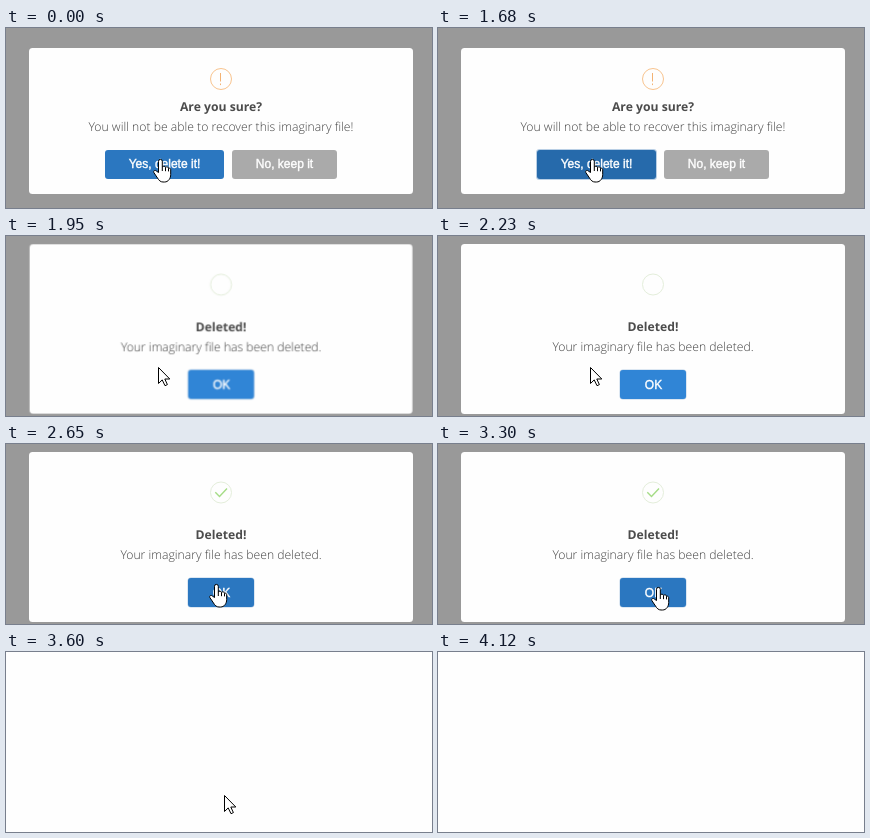
An HTML page for the animation above (4400 ms loop, 426x180 px).

```html
<!DOCTYPE html>
<html lang="en">
<head>
<meta charset="utf-8">
<title>Delete confirmation</title>
<style>
html, body { margin: 0; width: 100%; height: 100%; overflow: hidden; background: #fefefe; }
svg { display: block; width: 426px; height: 180px; }

.anim, .anim * { animation: 4400ms step-end infinite; }
.overlay { animation-name: overlay; }
.ask { animation-name: ask; }
.done { animation-name: done; transform-origin: 215px 93px; }
.yes { animation-name: yes; }
.focus { animation-name: focus; }
.ok { animation-name: ok; }
.ok-box { animation-name: ok-box; }
.check { stroke-dasharray: 1 2; animation-name: check; }
.cursor { animation-name: move; }
.hand { animation-name: hand; }
.arrow { animation-name: arrow; }

.popup { fill: #fefefe; }
.ring { fill: #b9cfe5; }
.title, .msg { font-family: "Open Sans", "Noto Sans", sans-serif; text-anchor: middle; text-rendering: geometricPrecision; }
.title { font-size: 12.2px; font-weight: 700; fill: #4c4c4c; }
.msg { font-size: 12.2px; font-weight: 300; fill: #404040; }
.label { font: 12px "Liberation Sans", Arial, sans-serif; text-anchor: middle; fill: #fff; stroke: #fff; stroke-width: .4; }

@keyframes overlay {
  0% { opacity: .4 }
  40.9% { opacity: 0 }
  44.31% { opacity: .4 }
  81.81%, 100% { opacity: 0 }
}
@keyframes ask {
  0% { opacity: 1 }
  40.9%, 100% { opacity: 0 }
}
@keyframes yes {
  0% { fill: #2b77c0 }
  38.18%, 100% { fill: #266aab }
}
@keyframes focus {
  0% { opacity: 0 }
  38.18%, 100% { opacity: 1 }
}
@keyframes done {
  0% { opacity: 0; transform: none }
  40.9% { opacity: 1; transform: scale(.7) }
  44.31% { opacity: 1; transform: scale(.997) }
  47.72% { opacity: 1; transform: none }
  78.4% { opacity: .87; transform: scale(.943) }
  81.81%, 100% { opacity: 0; transform: none }
}
@keyframes ok {
  0% { opacity: 1 }
  78.4%, 100% { opacity: .4 }
}
@keyframes ok-box {
  0% { fill: #3085d6 }
  56.81%, 100% { fill: #2b77c0 }
}
@keyframes check {
  0% { stroke-dashoffset: 1.01 }
  54.09% { stroke-dashoffset: .6 }
  56.81%, 100% { stroke-dashoffset: 0 }
}
@keyframes move {
  0% { transform: translate(152px, 131px) }
  54.09% { transform: translate(178px, 134px) }
  56.81% { transform: translate(204px, 139px) }
  60.22% { transform: translate(208px, 140px) }
  69.54% { transform: translate(212px, 141px) }
  72.27% { transform: translate(216px, 142px) }
  75% { transform: translate(218px, 143px) }
  88.18% { transform: translate(304px, 160px) }
  90.9%, 100% { transform: translate(364px, 172px) }
}
@keyframes hand {
  0% { visibility: visible }
  40.9% { visibility: hidden }
  56.81% { visibility: visible }
  78.4%, 100% { visibility: hidden }
}
@keyframes arrow {
  0% { visibility: hidden }
  40.9% { visibility: visible }
  56.81% { visibility: hidden }
  78.4% { visibility: visible }
  93.63%, 100% { visibility: hidden }
}
</style>
</head>
<body>
<svg class="anim" viewBox="0 0 426 180">
  <rect class="overlay" width="426" height="180"/>

  <g class="ask">
    <rect class="popup" x="23" y="20" width="384" height="146" rx="3.5"/>
    <g fill="none" stroke="#f8c48f">
      <circle cx="215" cy="51" r="10.5"/>
      <path d="M214.5 45v8.5M214.5 55.5v1.6" stroke="#f3b273"/>
    </g>
    <text class="title" x="215" y="83">Are you sure?</text>
    <text class="msg" x="215" y="103">You will not be able to recover this imaginary file!</text>
    <rect class="focus ring" x="98" y="121" width="121" height="31" rx="3.5"/>
    <rect class="yes" x="99" y="122" width="119" height="29" rx="3"/>
    <rect x="226" y="122" width="105" height="29" rx="3" fill="#aaa"/>
    <text class="label" x="158.5" y="140">Yes, delete it!</text>
    <text class="label" x="278.5" y="140">No, keep it</text>
  </g>

  <g class="done">
    <rect class="popup" x="23" y="8" width="384" height="170" rx="3.5"/>
    <g fill="none">
      <circle cx="215" cy="48.5" r="10.5" stroke="#e4eedb"/>
      <path class="check" pathLength="1" d="M209.3 48.2l4.2 4.2 7.5-8" stroke="#a5dc86" stroke-width="1.4"/>
    </g>
    <text class="title" x="215" y="95">Deleted!</text>
    <text class="msg" x="215" y="115">Your imaginary file has been deleted.</text>
    <g class="ok">
      <rect class="ring" x="181.5" y="133.5" width="67" height="30" rx="3.5"/>
      <rect class="ok-box" x="182" y="134" width="66" height="29" rx="3"/>
      <text class="label" x="215.5" y="153">OK</text>
    </g>
  </g>

  <g class="cursor" fill="#fff" stroke="#000" stroke-linejoin="round">
    <path class="arrow" d="M.5.5v16l3.7-3.6 2.8 5.8 2.4-1.1-2.6-5.6h5z"/>
    <g class="hand">
      <path d="M.5 13.5V2.3a1.9 1.9 0 0 1 3.8 0V8a1.7 1.5 0 0 1 3.2.6a1.6 1.4 0 0 1 3 .8a1.4 1.4 0 0 1 2.2 1.2V15.5c0 4-2.5 7.5-6 7.5H5C2.5 23 1 21.5-.5 19L-4 13.8c-1.2-1.8.9-3.2 2.3-1.8z"/>
      <path d="M4.3 8v4M7.5 8.6v3.6M10.5 9.4v3" fill="none"/>
    </g>
  </g>
</svg>
</body>
</html>
```
